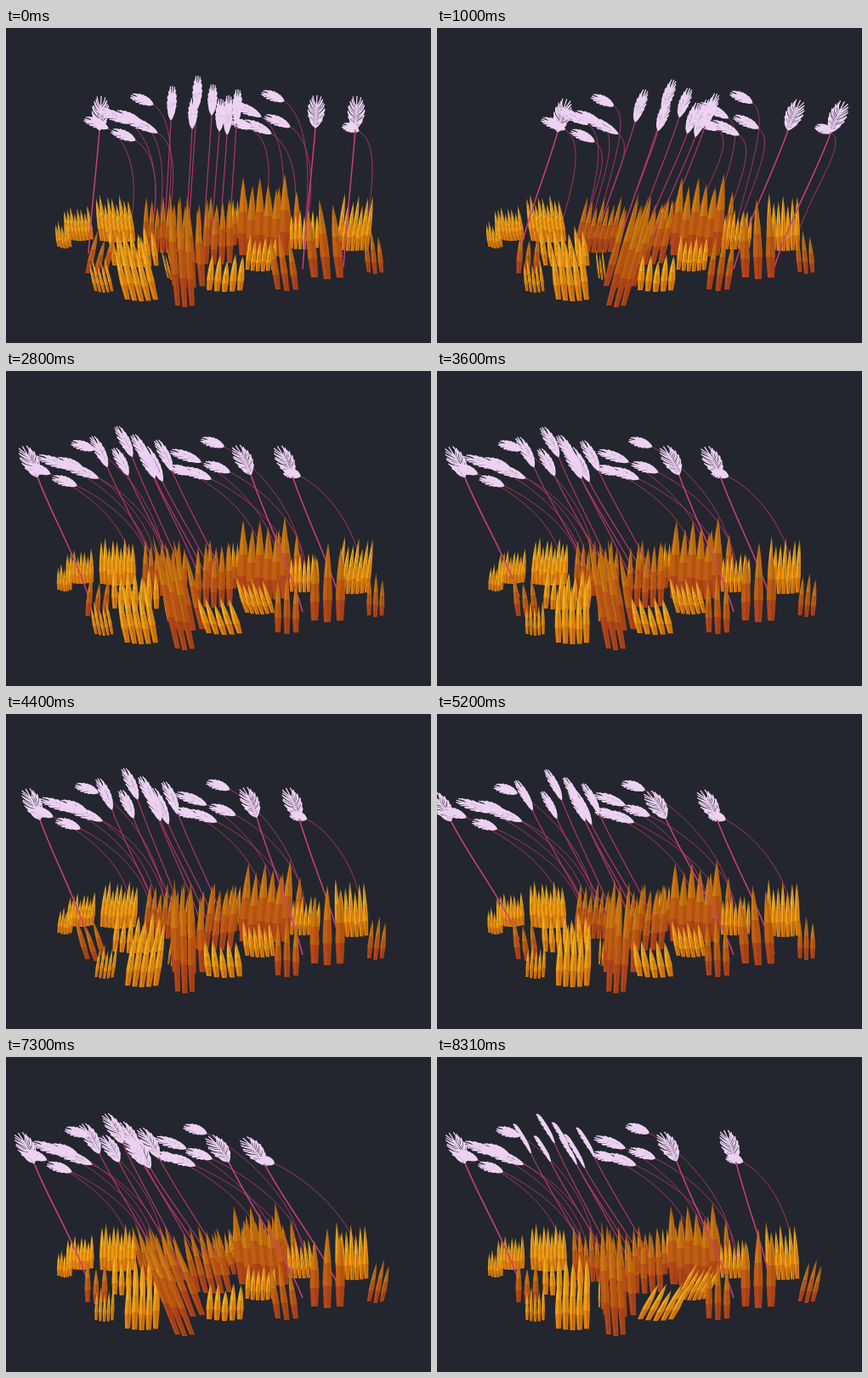
Animation of 500 by 370 pixels, one loop 8.41 s. Source, as an HTML page with a canvas:

```html
<!DOCTYPE html>
<html lang="en">
<head>
<meta charset="utf-8">
<title>Reeds in the wind</title>
<style>
  html, body { margin: 0; width: 100%; height: 100%; overflow: hidden; background: #23262e; }
  canvas { display: block; }
</style>
</head>
<body>
<canvas id="stage" width="500" height="370"></canvas>
<script>
const ctx = document.getElementById('stage').getContext('2d');
const LOOP = 8410, STEP = 100;
const GRASS_TIMES = [0, 2000, 2800, 4400, 5900, 7300, 8310];
const REED_TIMES = [0, 1600, 2000, 2800, 4400, 5900, 7300, 8310];

// Grass lean in percent of blade height
const lean = {
  west:   [-14, -14, -2, 9, -18, 0, -2],
  corner: [24, -6, 10, -30, 6, 0, 0],
  clump:  [-24, -4, -19, 14, -6, 3, 0],
  tall:   [-7, 45, -22, -3, 5, -38, -6],
  middle: [2, 32, 0, 10, 3, -25, -5],
  front:  [9, 3, -32, -12, -22, 4, 52],
  heart:  [0, 16, 0, 7, -5, -12, -4],
  trio:   [-14, 32, 0, 0, -8, -14, 0],
  broad:  [-10, 4, 1, 0, -12, 0, 0],
  east:   [12, -8, 12, -5, 3, -3, -6],
  edge:   [-10, -6, 2, 10, -6, 20, 24]
};

// Horizontal drift of the reed tips at four places across the field
const drift = [
  { x: 110, keys: [0, 46, 30, -73, -70, -110, -77, -77] },
  { x: 240, keys: [0, 62, 42, -76, -69, -82, -88, -87] },
  { x: 364, keys: [0, 70, 43, -76, -69, -116, -102, -82] },
  { x: 411, keys: [0, 75, 45, -74, -66, -97, -107, -59] }
];
const plumeGirth = [.6, .7, .65, .65, .4, .9, .22];

const bands = {
  yellow: ['#e3820f', '#f19c13', '#f6b020'],
  rust: ['#b5461a', '#c25d14', '#cd7812']
};

const plants = [];
const tuft = (color, sway, x0, x1, y, height, count, width) =>
  plants.push({ draw: drawTuft, color, sway, x0, x1, y, height, count, width });
const upright = (tipX, tipY, x, y, length, wide = false) =>
  plants.push({ draw: drawUpright, tipX, tipY, x, y, length, wide });
const droop = (tipX, tipY, x, y, length) =>
  plants.push({ draw: drawDroop, tipX, tipY, x, y, length });

tuft('yellow', 'west', 62, 76, 257, 32, 5, 4);
tuft('yellow', 'west', 73, 101, 248, 40, 8, 5);
tuft('yellow', 'west', 113, 150, 250, 56, 9, 6);
tuft('rust', 'corner', 96, 116, 288, 50, 3, 7);
tuft('yellow', 'clump', 106, 125, 309, 40, 5, 4);
tuft('yellow', 'west', 128, 177, 279, 48, 7, 7);
tuft('yellow', 'clump', 143, 176, 319, 76, 5, 8);
tuft('yellow', 'clump', 191, 198, 294, 38, 3, 2.5);
tuft('rust', 'middle', 164, 210, 262, 66, 8, 7);
tuft('rust', 'tall', 202, 219, 326, 136, 3, 8);
tuft('rust', 'tall', 199, 231, 303, 112, 4, 9);
tuft('rust', 'middle', 226, 263, 276, 78, 5, 8);
tuft('rust', 'middle', 240, 276, 254, 56, 6, 7);
tuft('yellow', 'heart', 262, 288, 245, 48, 6, 4);
tuft('yellow', 'front', 239, 275, 308, 45, 5, 8);
tuft('yellow', 'front', 284, 314, 284, 42, 6, 6);
tuft('rust', 'heart', 279, 328, 267, 96, 6, 12);
tuft('rust', 'heart', 290, 342, 250, 66, 6, 8);
tuft('rust', 'trio', 320, 341, 307, 72, 3, 8);
tuft('rust', 'broad', 363, 393, 293, 96, 3, 11);
tuft('yellow', 'heart', 326, 366, 258, 48, 9, 5);
tuft('yellow', 'east', 391, 424, 260, 66, 7, 6);
tuft('rust', 'edge', 427, 442, 287, 52, 3, 6);

upright(110, 120, 97, 265, 40, true);
upright(194, 108, 186, 255, 40);
upright(219, 118, 211, 262, 36);
upright(224, 96, 214, 258, 40);
upright(242, 102, 232, 255, 36);
upright(251, 121, 241, 255, 38);
upright(260, 125, 251, 257, 46);
upright(271, 112, 262, 260, 40);
upright(364, 117, 349, 283, 38, true);
upright(411, 119, 397, 281, 39, true);

droop(120, 118, 146, 232, 30);
droop(145, 112, 172, 238, 42);
droop(152, 132, 170, 240, 30);
droop(173, 90, 187, 240, 28);
droop(178, 123, 188, 242, 46);
droop(160, 112, 178, 240, 34);
droop(300, 104, 321, 240, 38);
droop(312, 124, 336, 240, 36);
droop(288, 118, 302, 230, 26);
droop(327, 86, 350, 240, 28);
droop(334, 116, 353, 240, 32);
droop(415, 121, 420, 255, 20);
plants.sort((a, b) => a.y - b.y);

// Smooth curve through the keyed values
function sample(times, keys, t) {
  const last = times.length - 1;
  let i = 0;
  while (i < last - 1 && t >= times[i + 1]) i++;
  const slope = k => {
    const a = Math.max(0, k - 1), b = Math.min(last, k + 1);
    return (keys[b] - keys[a]) / (times[b] - times[a]);
  };
  const span = times[i + 1] - times[i];
  const u = Math.min(1, (t - times[i]) / span), v = 1 - u;
  return v * v * (1 + 2 * u) * keys[i] + u * u * (3 - 2 * u) * keys[i + 1] +
    u * v * span * (v * slope(i) - u * slope(i + 1));
}

function driftAt(x, t) {
  const at = place => sample(REED_TIMES, place.keys, t);
  let i = 0;
  while (i < drift.length - 2 && x > drift[i + 1].x) i++;
  const a = drift[i], b = drift[i + 1];
  const mix = Math.max(0, Math.min(1, (x - a.x) / (b.x - a.x)));
  return at(a) * (1 - mix) + at(b) * mix;
}

function blade(h, w, tones) {
  const fill = ctx.createLinearGradient(0, 0, 0, -h);
  [0, .28, .28, .56, .56, 1].forEach((stop, i) => fill.addColorStop(stop, tones[i >> 1]));
  const side = dir => {
    ctx.lineTo(dir * w * .36, 0);
    ctx.lineTo(dir * w * .5, -h * .32);
    ctx.quadraticCurveTo(dir * w * .42, -h * .7, 0, -h);
  };
  for (const dir of [-1, 1]) {
    ctx.beginPath();
    ctx.moveTo(0, 0);
    side(dir);
    ctx.fillStyle = fill;
    ctx.fill();
  }
  ctx.fillStyle = 'rgba(120,50,0,.22)';
  ctx.fill();
}

function drawTuft(p, t) {
  const slope = sample(GRASS_TIMES, lean[p.sway], t) / 100;
  for (let i = 0; i < p.count; i++) {
    const u = i / (p.count - 1);
    const height = p.height * (.9 + .1 * Math.sin(i * 2.3 + p.x0));
    ctx.save();
    ctx.transform(1, 0, -slope, 1, p.x0 + (p.x1 - p.x0) * u, p.y + Math.sin(u * 3) * 2);
    blade(height, p.width, bands[p.color]);
    ctx.restore();
  }
}

function plume(x, y, angle, length, girth, bend) {
  ctx.save();
  ctx.translate(x, y);
  ctx.rotate(angle);
  ctx.strokeStyle = '#edd2f3';
  ctx.lineWidth = 1.3;
  ctx.beginPath();
  ctx.moveTo(0, 0);
  ctx.quadraticCurveTo(0, -length * .6, bend, -length);
  for (let i = 0; i < 14; i++) {
    const k = i / 13, root = -length * k * .68;
    const reach = girth * (.55 + .45 * Math.sin(k * 3 + .3));
    for (const side of [-1, 1]) {
      const end = root - length * (.27 + .05 * Math.sin(i * 4 + side));
      ctx.moveTo(bend * k * k * .4, root);
      ctx.quadraticCurveTo(side * reach * .8, root - length * .1, side * reach + bend * k, end);
    }
  }
  ctx.stroke();
  ctx.restore();
}

function stem(color, width, ...points) {
  ctx.strokeStyle = color;
  ctx.lineWidth = width;
  ctx.beginPath();
  ctx.moveTo(points[0], points[1]);
  ctx.bezierCurveTo(...points.slice(2));
  ctx.stroke();
}

function drawUpright(p, t) {
  const shift = driftAt(p.tipX, t);
  const x = p.tipX + shift, y = p.tipY + Math.abs(shift) * .06;
  const dx = x - p.x, dy = y - p.y;
  stem(p.wide ? '#cf3f78' : '#b53569', p.wide ? 1.5 : 1.2, p.x, p.y,
    p.x + dx * .24, p.y + dy * .33, p.x + dx * .72, p.y + dy * .68, x, y);
  const girth = p.wide ? 10 : 9 * sample(GRASS_TIMES, plumeGirth, t);
  plume(x, y, .05 + shift * .0057, p.length, girth, shift * .05);
}

function drawDroop(p, t) {
  const shift = driftAt(p.tipX, t) * .93;
  const x = p.tipX + shift, y = p.tipY + Math.abs(shift) * .04;
  stem('#a63361', 1, p.x, p.y, p.x + 12 + shift * .16, p.y - (p.y - y) * .5,
    x + 24 - shift * .08, y + 14, x, y);
  plume(x, y, -1.08 + shift * .001, p.length, 5.5, -3);
}

function render(now) {
  const t = Math.floor(now % LOOP / STEP) * STEP;
  ctx.fillStyle = '#23262e';
  ctx.fillRect(0, 0, 500, 370);
  for (const plant of plants) plant.draw(plant, t);
  requestAnimationFrame(render);
}
requestAnimationFrame(render);
</script>
</body>
</html>
```
